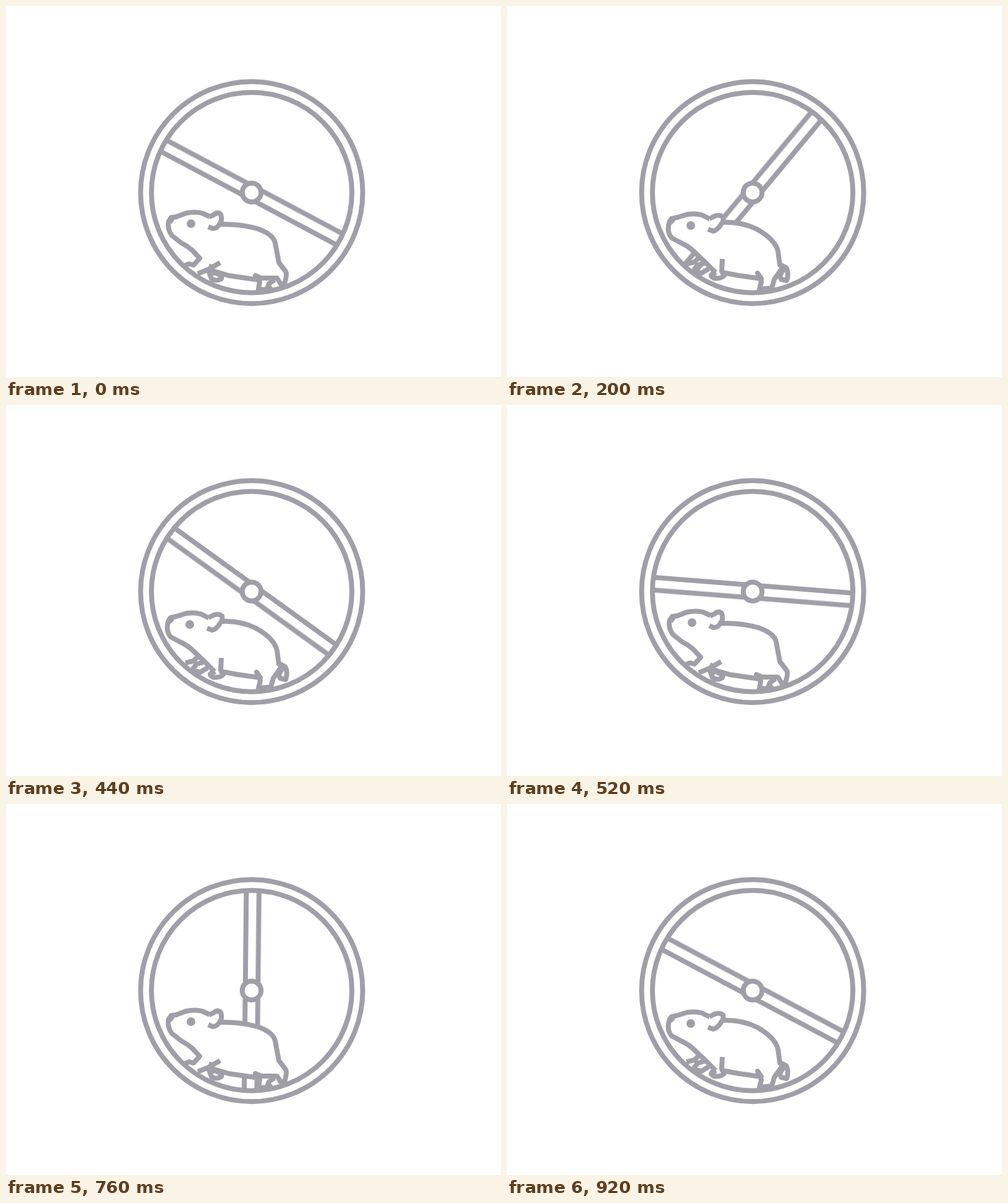
An HTML page for the animation above (960 ms loop, 800x600 px).

```html
<!DOCTYPE html>
<html lang="en">
<head>
<meta charset="utf-8">
<title>Hamster wheel</title>
<style>
  html, body { margin: 0; width: 100%; height: 100%; overflow: hidden; background: #fff; }
  svg { display: block; width: 800px; height: 600px; }
  .ink { fill: none; stroke: #a09fa8; stroke-width: 8; stroke-linejoin: round; }
  .solid { fill: #fff; }
  .eye { fill: #a09fa8; stroke: none; }

  .bar { transform-origin: 397px 301.7px; animation: spin 960ms steps(24, jump-none) infinite; }
  @keyframes spin {
    from { transform: rotate(28deg); }
    to { transform: rotate(-332deg); }
  }

  /* Three running poses, 80 ms each */
  .pose { visibility: hidden; animation: show 240ms step-end infinite; }
  .reach { animation-delay: -160ms; }
  .gather { animation-delay: -80ms; }
  @keyframes show {
    0% { visibility: visible; }
    33.333%, 100% { visibility: hidden; }
  }
</style>
</head>
<body>
<svg viewBox="0 0 800 600">
  <g class="ink">
    <path class="bar" d="M236 291.4H558M236 312H558"/>
    <circle class="solid" cx="397" cy="301.7" r="15.2"/>

    <g class="pose stretch">
      <path class="solid" d="M288 420L296 417L303 419L313 408L301 395Q293 388 283 383L268 371Q260 360 263 348L267 342L275 341L291 335Q306 332 317 335L328 340L338 347L346 353Q378 352 406 360Q432 369 435 383L441 415L451 428Q455 432 451 446L446 453L438 440L412 440L403 436L408 443L360 436L330 427"/>
      <path class="solid" d="M328 341L335 338Q342 332 347 337Q350 346 346 351Q342 360 334 360L327 357"/>
      <path d="M264 345L270 349M346 415L327 426L310 433M333 418L328 430L332 441Q340 446 348 441L349 437L338 431L326 435"/>
      <path d="M405 437L410 446L408 458L421 459L425 449L434 443M426 457L430 454"/>
      <circle class="eye" cx="299" cy="352" r="7"/>
    </g>

    <g class="pose reach">
      <path class="solid" d="M311 431L320 428L323 413Q313 400 303 395L289 384L273 372Q264 361 269 348L272 344L281 343L297 338Q312 336 322 339L333 344L343 350L351 353Q386 353 415 367Q441 380 443 394L447 426Q448 436 444 444L445 455L428 456L432 448L408 437L413 444L375 439L336 431"/>
      <path class="solid" d="M333 345L340 342Q347 336 351 341Q354 349 350 354Q346 363 339 363L331 360"/>
      <path d="M269 348L275 351M353 417L333 432L327 443M310 431L321 436L329 442"/>
      <circle class="eye" cx="304" cy="356" r="7"/>
    </g>

    <g class="pose gather">
      <path class="solid" d="M337 431L322 416L302 397Q294 389 281 383L266 375Q257 364 263 348L266 344L275 342L291 337Q306 335 315 338L327 344L338 348L346 350Q378 348 404 361Q434 378 438 397L441 419L446 422L432 442L428 456L408 458L411 446L405 432L411 441L375 436L348 431"/>
      <path class="solid" d="M327 344L333 341Q342 336 349 341Q351 348 346 353Q340 363 333 364L325 361"/>
      <path d="M264 346L269 351M348 409L347 429L351 436Q345 442 334 440Q328 437 331 434L338 431"/>
      <path d="M441 418L451 423Q456 432 452 444L443 442L441 436L447 425"/>
      <path d="M310 407L303 414L290 417M302 427L308 419L319 416M298 429L314 432L326 425"/>
      <circle class="eye" cx="297" cy="355" r="7"/>
    </g>

    <circle cx="397" cy="301.7" r="162"/>
    <circle cx="397" cy="301.7" r="179.5"/>
  </g>
</svg>
</body>
</html>
```
